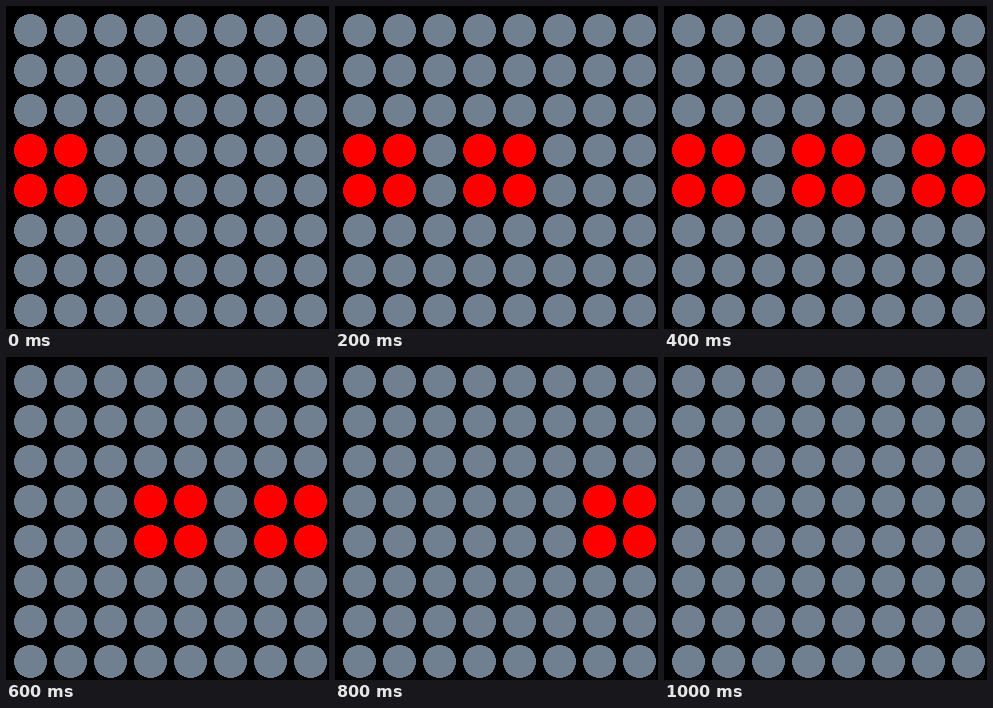
Recreate the animation shown at these times as an HTML page. Size 323 by 323 pixels, loop 1200 ms.

```html
<!DOCTYPE html>
<html lang="en">
<head>
<meta charset="utf-8">
<title>Dot matrix</title>
<style>
  html, body { margin: 0; width: 100%; height: 100%; overflow: hidden; background: #000; }
  svg { display: block; width: 323px; height: 323px; shape-rendering: crispEdges; }
  circle { fill: #708090; }
</style>
</head>
<body>
<svg id="board" viewBox="0 0 323 323"></svg>
<script>
const SIZE = 8, PITCH = 40, FIRST = 24.5, RADIUS = 16.5;
const LOOP = 1200, LIT = 600;
const OFF = '#708090', ON = '#ff0000';

// Each 2x2 block: left column and the time it lights up
const blocks = [
  { col: 0, start: 0 },
  { col: 3, start: 200 },
  { col: 6, start: 400 }
];

const board = document.getElementById('board');
const dots = [];

for (let row = 0; row < SIZE; row++) {
  dots.push([]);
  for (let col = 0; col < SIZE; col++) {
    const dot = document.createElementNS(board.namespaceURI, 'circle');
    dot.setAttribute('cx', FIRST + col * PITCH);
    dot.setAttribute('cy', FIRST + row * PITCH);
    dot.setAttribute('r', RADIUS);
    board.append(dot);
    dots[row].push(dot);
  }
}

for (const { col, start } of blocks) {
  const from = start / LOOP, to = (start + LIT) / LOOP;
  const steps = [
    { offset: 0, fill: start ? OFF : ON },
    { offset: from, fill: ON },
    { offset: to, fill: OFF },
    { offset: 1, fill: OFF }
  ].map(step => ({ ...step, easing: 'step-end' }));

  for (const row of [3, 4]) {
    for (const c of [col, col + 1]) {
      const anim = dots[row][c].animate(steps, { duration: LOOP, iterations: Infinity });
      anim.startTime = 0;
    }
  }
}
</script>
</body>
</html>
```
